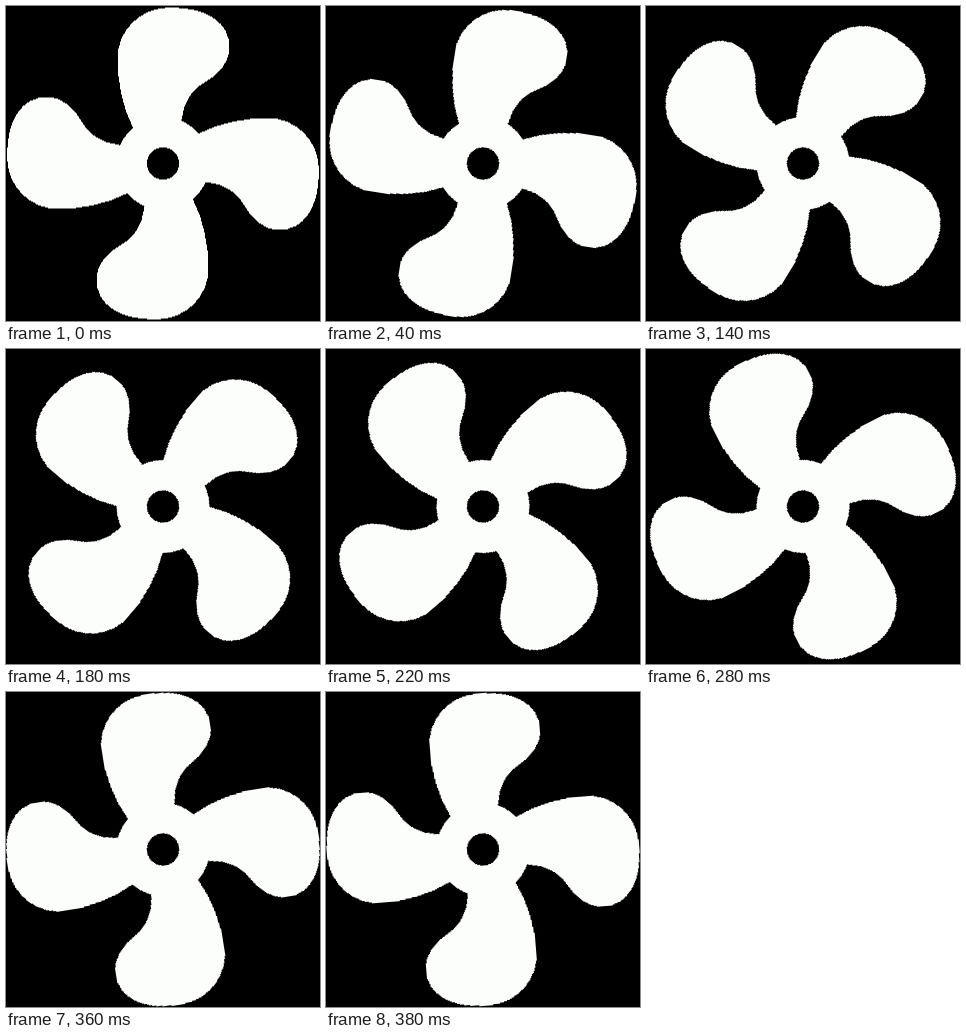
Animation of 314 by 315 pixels, one loop 0.4 s. Source, as an HTML page:

```html
<!DOCTYPE html>
<html lang="en">
<head>
<meta charset="utf-8">
<title>Spinning fan</title>
<style>
  html, body { margin: 0; width: 100%; height: 100%; overflow: hidden; background: #000; }
  svg { display: block; width: 314px; height: 315px; }
  #fan { fill: #fcfefc; shape-rendering: crispEdges; transform-origin: 0 0; }
</style>
</head>
<body>
<svg viewBox="0 0 314 315">
  <defs>
    <path id="blade" d="M0 0L-30 -36C-40.5 -56 -45.5 -82 -45.5 -105
      C-45.5 -133 -23 -156 7 -156C46 -156 66.5 -140 66.5 -116
      C66.5 -102 56 -89.5 43 -82C29 -74.5 21 -63 18.5 -43.5Z"/>
  </defs>
  <g transform="translate(157 157.5)">
    <g id="fan">
      <use href="#blade"/>
      <use href="#blade" transform="rotate(90)"/>
      <use href="#blade" transform="rotate(180)"/>
      <use href="#blade" transform="rotate(270)"/>
      <circle r="46.5"/>
      <circle r="16" fill="#000"/>
    </g>
  </g>
</svg>
<script>
  // A quarter turn looks the same as a full one, so it closes the loop.
  document.getElementById('fan').animate(
    [{ transform: 'rotate(0deg)' }, { transform: 'rotate(90deg)' }],
    { duration: 400, iterations: Infinity, easing: 'steps(20, end)' }
  );
</script>
</body>
</html>
```
